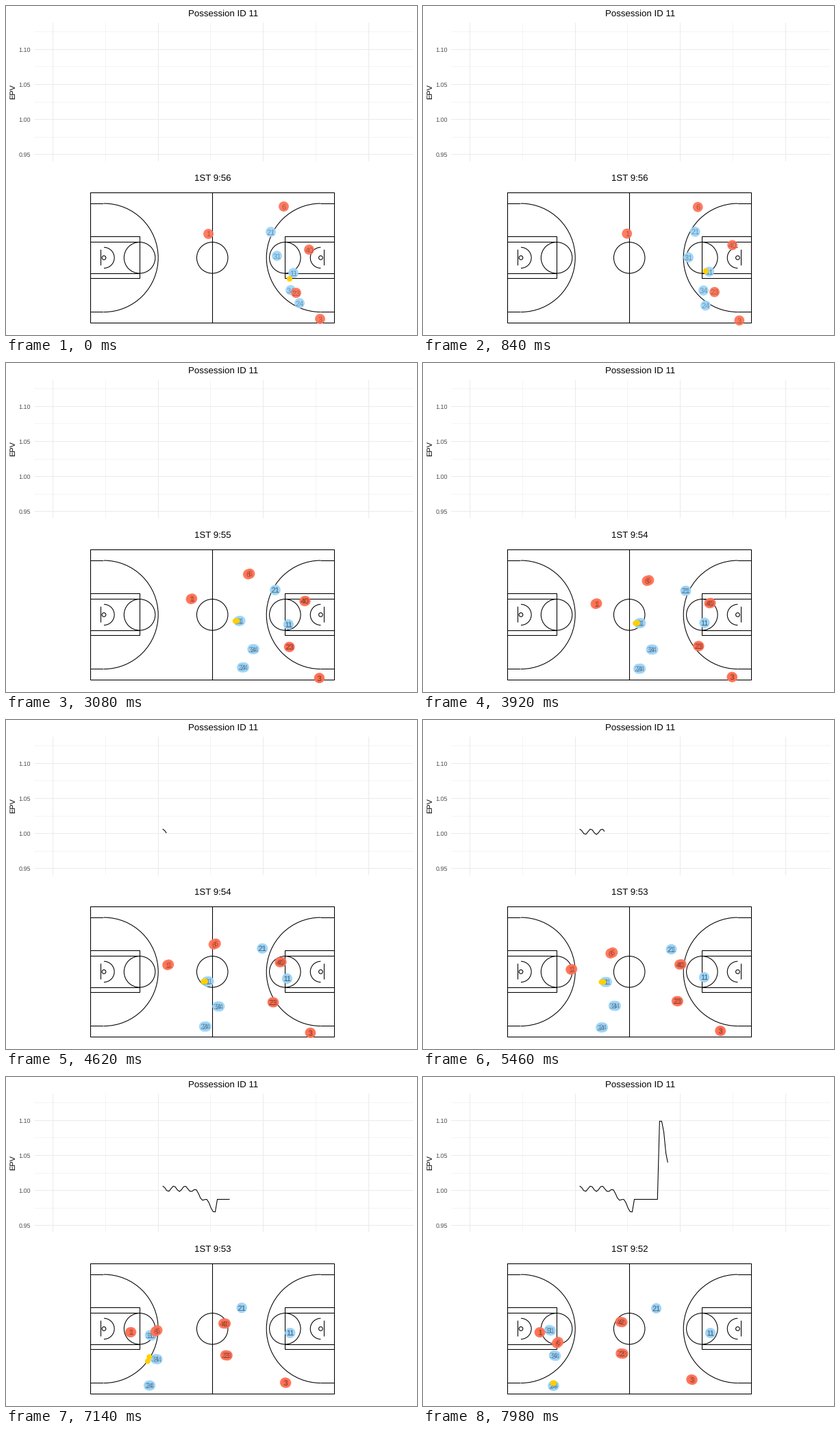
Animation, 600 px wide and 480 px high, one loop 8 s. Source, as a matplotlib script:

```python
import numpy as np
import matplotlib.pyplot as plt
from matplotlib.animation import FuncAnimation
from matplotlib.patches import Arc, Circle

W, H, DPI = 600, 480, 100
PX = 72 / DPI                    # one pixel in points
LOOP, TICK, HOLD = 8000, 40, 140
STEPS = LOOP // HOLD

plt.rcParams["font.family"] = "Liberation Sans"
plt.rcParams["text.hinting"] = "none"

# Each run is one cubic Bezier: start, two handles, end
BLUE = {
    "21": [(386, 329), (434, 328), (343, 335), (340, 337)],
    "31": [(395, 364), (380, 369), (264, 398), (185, 369)],
    "11": [(419, 389), (414, 384), (401, 371), (419, 373)],
    "34": [(415, 414), (409, 415), (273, 425), (192, 406)],
    "24": [(428, 433), (388, 445), (241, 449), (190, 450)],
}
RED = {
    "1": [(295, 332), (316, 325), (198, 377), (170, 372)],
    "6": [(405, 292), (406, 290), (262, 331), (196, 387)],
    "40": [(442, 355), (486, 327), (382, 369), (289, 357)],
    "23": [(423, 418), (435, 414), (396, 412), (290, 403)],
    "3": [(458, 456), (473, 465), (444, 456), (392, 441)],
}
LOOSE_BALL = 414, 398
# Passes: start, arrival, receiver, where the receiver holds the ball
PASSES = [(0, 6, "11", (-5, -1)), (6, 16, "31", (-5, 0)),
          (47.4, 54.6, "24", (0, -4))]

fig = plt.figure(figsize=(W / DPI, H / DPI), dpi=DPI, facecolor="white")
ax = fig.add_axes([0, 0, 1, 1])
ax.set(xlim=(0, W), ylim=(H, 0))
ax.axis("off")


def line(xs, ys, color="black", width=1.07, **kw):
    """Straight line that fills the pixels its coordinates fall in."""
    return ax.plot(np.array(xs) - 0.5, np.array(ys) - 0.5, color=color,
                   lw=width * PX, solid_capstyle="butt", **kw)[0]


def box(x0, y0, x1, y1):
    line([x0, x1, x1, x0, x0], [y0, y0, y1, y1, y0],
         solid_joinstyle="miter")


def label(x, y, text, size, color="black", ha="center", **kw):
    return ax.text(x, y, text, fontsize=size * PX, color=color, ha=ha,
                   **{"va": "baseline", **kw})


def outline(shape):
    shape.set(facecolor="none", edgecolor="black", linewidth=1.07 * PX)
    ax.add_patch(shape)


def draw_chart():
    for i in range(8):
        y = 37.4 + 25.65 * i
        line([41, 594], [y, y], "0.92", 1.07 if i % 2 else 0.55)
    for i in range(7):
        x = 68.5 + 76.8 * i
        line([x, x], [24, 226], "0.92", 0.55 if i % 2 else 1.07)
    for i in range(4):
        label(36, 66.5 + 51.3 * i, f"{1.10 - 0.05 * i:.2f}", 9, "0.3", "right")
    label(10, 125, "EPV", 11, rotation=90, va="center")
    label(317.5, 15, "Possession ID 11", 13.2)


def draw_court():
    cx, cy, ft = 301.2, 367.3, 3.79
    top, bottom = cy - 25 * ft, cy + 25 * ft
    box(cx - 47 * ft, top, cx + 47 * ft, bottom)
    line([cx, cx], [top, bottom])
    outline(Circle((cx, cy), 6 * ft))
    for side in (-1, 1):
        base, board, hoop, foul = (cx + side * (47 - d) * ft
                                   for d in (0, 4, 5.25, 19))
        box(base, cy - 8 * ft, foul, cy + 8 * ft)
        for sign in (-1, 1):
            line([base, foul], [cy + sign * 6 * ft] * 2)
            line([base, hoop], [cy + sign * 20.9 * ft] * 2)
        line([board, board], [cy - 3 * ft, cy + 3 * ft])
        outline(Circle((foul, cy), 6 * ft))
        outline(Circle((hoop, cy), 0.75 * ft))
        for r in (20.9 * ft, 4 * ft):
            outline(Arc((hoop, cy), 2 * r, 2 * r, angle=90 + 90 * side,
                        theta1=-90, theta2=90))


def epv_curve():
    """Wobble, slide, flat while a pass is in the air, then jump and fall."""
    i = np.arange(43)
    slide = 33 * np.clip((i - 13) / 12, 0, 1) ** 1.3
    wobble = 4 * np.cos(2 * np.pi * i / 5.3)
    fall = 31 * (1 - np.cos(np.pi * np.clip(i - 39, 0, 3) / 3))
    y = np.select([i < 26, i < 38], [163 + slide - wobble, 178.5], 64.5 + fall)
    return 228.7 + 3.07 * i, y


def run(path, t):
    u = t / STEPS
    a, b, c, d = np.array(path, float) + 0.5
    v = 1 - u
    return v**3 * a + 3 * v * v * u * b + 3 * v * u * u * c + u**3 * d


def ball_at(t):
    spot = np.array(LOOSE_BALL, float)
    for start, arrival, holder, hold in PASSES:
        part = np.clip((t - start) / (arrival - start), 0, 1)
        spot = spot + part * (run(BLUE[holder], t) + hold - spot)
    return spot


def disc(radius, color, alpha, z):
    return ax.add_patch(Circle((0, 0), radius, facecolor=color, alpha=alpha,
                               linewidth=0, zorder=z))


draw_chart()
draw_court()
clock = label(301.5, 255, "", 13.2)
EPV_X, EPV_Y = epv_curve()
epv = line([], [], zorder=3)

# Two copies of each token, one moment apart
tokens = []
for team, color, z in ((BLUE, "#9dd5fa", 4), (RED, "#ff7256", 6)):
    for number, path in team.items():
        for copy in (0, 1):
            tokens.append((path, copy, disc(7.4, color, 0.93, z),
                           label(0, 0, number, 11, alpha=0.33, zorder=z + 1)))
balls = [disc(4, "#ffd000", 1, 8) for _ in range(2)]


def update(n):
    k = (n * TICK + TICK // 2) // HOLD
    doubled = k >= 9
    times = (k - 0.33, k + 0.33) if doubled else (k, k)
    clock.set_text(f"1ST 9:{56 - (k + 6) // 15}")

    for path, copy, dot, text in tokens:
        x, y = run(path, times[copy])
        dot.center = x, y
        text.set_position((x, y + 4))
        shown = doubled or copy == 0
        dot.set_visible(shown)
        text.set_visible(shown)
    for t, ball in zip(times, balls):
        ball.center = ball_at(t)

    tip = 357.3 - 5.13 * (STEPS - k)
    past = EPV_X < tip
    epv.set_data(np.append(EPV_X[past], tip),
                 np.append(EPV_Y[past], np.interp(tip, EPV_X, EPV_Y)))
    epv.set_visible(k > 32)
    return []


anim = FuncAnimation(fig, update, frames=LOOP // TICK, interval=TICK,
                     repeat=True, repeat_delay=0, blit=False)
plt.show()
```
